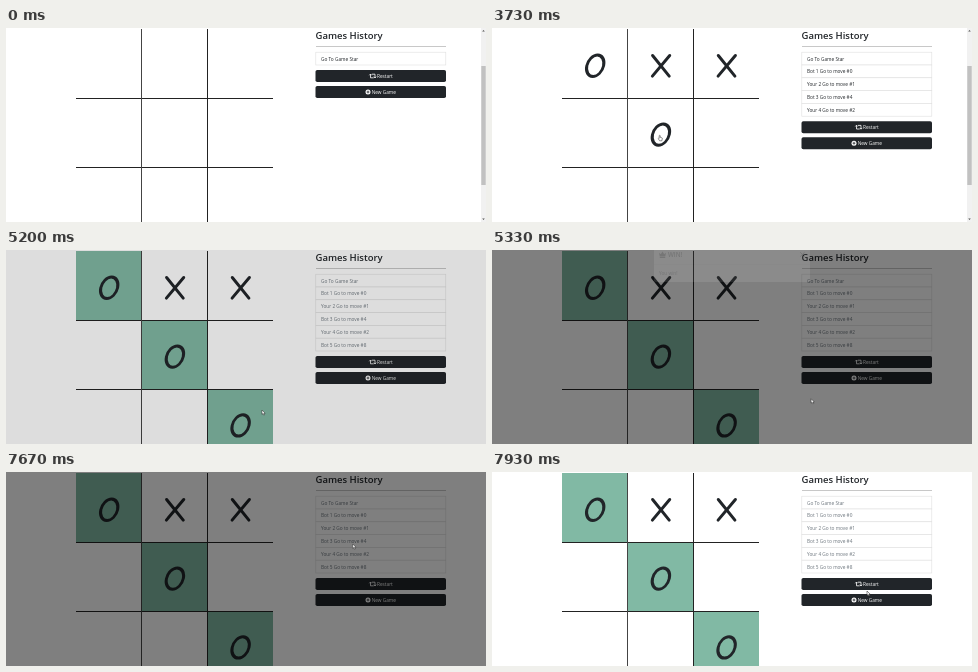
An HTML page that plays this animation: 480 px wide and 194 px high, repeating every 8000 ms.

```html
<!DOCTYPE html>
<html lang="en">
<head>
<meta charset="utf-8">
<title>Tic-tac-toe</title>
<style>
html, body { margin: 0; width: 100%; height: 100%; overflow: hidden; background: #fff; }
svg { display: block; width: 100vw; height: 100vh; }
text { font: 4.75px "Open Sans", "Noto Sans", sans-serif; fill: #212529; }
.title { font-size: 9.5px; font-weight: 600; }
.win { font-size: 6.2px; font-weight: 600; }
.btn text, .btn .solid { fill: #fff; }
.btn rect { fill: #212529; }
.mark { fill: none; stroke: #212529; stroke-width: 3; stroke-linecap: round; }
.item rect { fill: #fff; stroke: #dfdfdf; stroke-width: .6; }
.over .item text { fill: #6c757d; }
.won { fill: #81b9a4; }
.cursor path { fill: #fff; stroke: #222; stroke-width: .5; stroke-linejoin: round; }
</style>
</head>
<body>
<svg viewBox="0 0 480 194">
  <g id="cells"></g>
  <path d="M70 70h197v1H70zM70 139h197v1H70zM201 1h1v193h-1z" fill="#222"/>
  <path d="M135 1h1v193h-1z" fill="#444"/>
  <text class="title" x="309.5" y="11.4">Games History</text>
  <rect x="310" y="18" width="130" height="1" fill="#c8c8c8"/>
  <g id="list"></g>
  <g id="buttons">
    <g class="btn">
      <rect x="309.5" y="42" width="130.5" height="12" rx="1.8"/>
      <path d="M364.5 46.2v3.6h3.2M365.9 46.2h3.1v3.6M363.3 47.3l1.2-1.3 1.2 1.3M367.8 48.7l1.2 1.3 1.2-1.3" fill="none" stroke="#fff" stroke-width=".8"/>
      <text x="371" y="49.9">Restart</text>
    </g>
    <g class="btn">
      <rect x="309.5" y="58" width="130.5" height="12" rx="1.8"/>
      <circle class="solid" cx="362" cy="64" r="2.5"/>
      <path d="M360.6 64h2.8M362 62.6v2.8" stroke="#212529" stroke-width=".8"/>
      <text x="365.7" y="65.8">New Game</text>
    </g>
  </g>
  <g id="scrollbar">
    <rect x="475" width="5" height="194" fill="#f1f1f1"/>
    <rect x="475.3" y="38" width="4.4" height="119" fill="#c1c1c1"/>
    <path d="M476.2 3.4l1.3-1.5 1.3 1.5zM476.2 190.4l1.3 1.5 1.3-1.5z" fill="#505050"/>
  </g>
  <rect id="shade" width="480" height="194"/>
  <g id="modal">
    <rect x="162" y="9" width="156" height="37.3" rx="1.8" fill="#fff"/>
    <rect x="162" y="28.5" width="156" height=".5" fill="#d5d8db"/>
    <path d="M167 17l1.8 1.6 1.7-2.9 1.7 2.9 1.8-1.6-.8 3.8h-5.4zM167.8 21.2h5.4v1h-5.4z" fill="#212529"/>
    <text class="win" x="176" y="21.4">WIN!</text>
    <text x="167" y="39.7">You win!</text>
    <path d="M308.2 16.5l4.4 4.4m0-4.4l-4.4 4.4" stroke="#222" stroke-width=".9"/>
  </g>
  <g id="cursor" class="cursor">
    <path id="hand" d="M1.2 3.3V.6q.5-.6 1 0v1.7l1.7.5q.5.2.4.7l-.4 2.3H1.6L.2 3.6q.4-.7 1-.3z"/>
    <path id="arrow" d="M0 0v4.4l1-.9.8 1.6.8-.4-.8-1.5h1.4z"/>
  </g>
</svg>
<script>
const $ = id => document.getElementById(id);
const LOOP = 8000, FPS = 15, ROW = 12.8, OVER = 5120;

// [time, cell, mark]
const moves = [[2660, 0, "O"], [2660, 1, "X"], [3720, 4, "O"], [3720, 2, "X"], [OVER, 8, "O"]];

// [time, x, y] of the pointer
const path = [
  [400, 213, 11], [530, 202, 16], [670, 225, 22], [870, 236, 38], [1100, 195, 63],
  [1470, 141, 46], [1530, 138, 46], [1670, 97, 42], [1870, 96, 41], [2000, 101, 40],
  [2800, 101, 40], [3070, 154, 88], [3200, 154, 88], [3330, 166, 107], [3870, 166, 107],
  [4470, 222, 166], [5130, 222, 166], [5330, 319, 149], [5930, 336, 110],
  [6670, 308, 16], [7470, 308, 16], [7800, 373, 110], [7930, 375, 119]
];

const clamp = p => Math.max(0, Math.min(1, p));
const ramp = (t, start, length) => clamp((t - start) / length);
const easeOut = p => 1 - (1 - p) ** 2;
const show = (el, on) => { el.style.display = on ? "" : "none"; };

function drawMark(cell, mark) {
  const x = 103.2 + cell % 3 * 65.7, y = 37.8 + Math.floor(cell / 3) * 68.8;
  const shape = mark === "O"
    ? '<ellipse rx="8.4" ry="10.7" transform="skewX(-12)"/>'
    : '<path d="M-8.3-10.3L8.3 10.3M8.8-10.3L-8.5 10.3"/>';
  return `<g class="mark" transform="translate(${x} ${y})">${shape}</g>`;
}

const drawItem = (label, i) => `<g class="item">
  <rect x="309.8" y="${24.2 + i * ROW}" width="130" height="${ROW}"/>
  <text x="315" y="${32.5 + i * ROW}">${label}</text></g>`;

$("cells").innerHTML = '<path class="won" d="M70 1h65v69H70zM136 71h65v68h-65zM202 140h65v54h-65z"/>' +
  moves.map(([, cell, mark]) => drawMark(cell, mark)).join("");
$("list").innerHTML = ["Go To Game Star", ...moves.map(([, cell, mark], i) =>
  `${mark === "O" ? "Bot" : "Your"} ${i + 1} Go to move #${cell}`)].map(drawItem).join("");

const [won, ...marks] = $("cells").children;
const items = [...$("list").children].slice(1);

function pointer(t) {
  const i = path.findIndex(p => p[0] > t);
  if (i < 0) return path.at(-1).slice(1);
  const [t0, x0, y0] = path[i - 1], [t1, x1, y1] = path[i];
  const p = ramp(t, t0, t1 - t0);
  return [x0 + (x1 - x0) * p, y0 + (y1 - y0) * p];
}

function render(t) {
  const played = moves.filter(m => t >= m[0]).length;
  marks.forEach((el, i) => show(el, i < played));
  items.forEach((el, i) => show(el, i < played));
  $("buttons").setAttribute("transform", `translate(0 ${played * ROW})`);

  const over = t >= OVER;
  show(won, over);
  $("list").classList.toggle("over", over);
  show($("scrollbar"), !over);

  $("shade").setAttribute("opacity", .5 * (ramp(t, 5160, 150) - ramp(t, 7760, 150)));
  $("modal").setAttribute("opacity", ramp(t, 5320, 150) - ramp(t, 7460, 150));
  const drop = easeOut(ramp(t, 5320, 300)) - easeOut(ramp(t, 7460, 300));
  $("modal").setAttribute("transform", `translate(0 ${15.6 * (drop - 1)})`);

  const visible = t >= 400;
  show($("cursor"), visible);
  if (!visible) return;
  const arrow = t > 5140 && t < 6600 || t > 7470 && t < 7780 || t > 7900;
  show($("arrow"), arrow);
  show($("hand"), !arrow);
  $("cursor").setAttribute("transform", `translate(${pointer(t)})`);
}

function tick() {
  const t = performance.now() % LOOP;
  render(Math.floor(t * FPS / 1000 + .1) * 1000 / FPS);
  requestAnimationFrame(tick);
}
tick();
</script>
</body>
</html>
```
